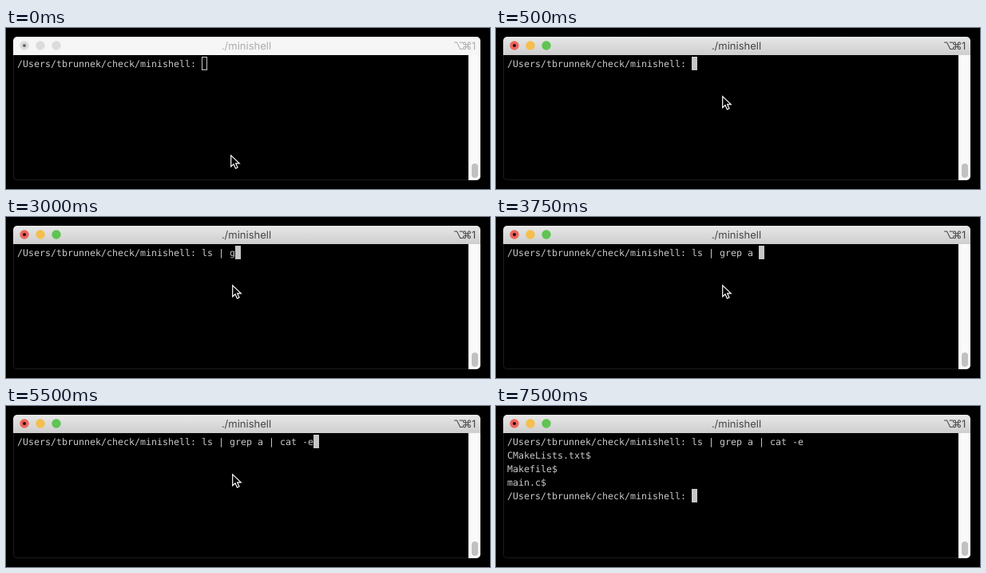
Write an HTML page that moves like this. It is 606x202 px and loops after 7.75 s.

```html
<!DOCTYPE html>
<html lang="en">
<head>
<meta charset="utf-8">
<title>minishell</title>
<style>
  html, body { margin: 0; width: 100%; height: 100%; overflow: hidden; background: #000; }
  svg { display: block; width: 606px; height: 202px; }
  text { white-space: pre; text-rendering: geometricPrecision; }
  .bar { font: 13px Inter, "Liberation Sans", sans-serif; }
  .term { font: 11.63px "DejaVu Sans Mono", monospace; fill: #c9c9c9; }
</style>
</head>
<body>
<svg viewBox="0 0 606 202">
  <defs>
    <linearGradient id="active" x2="0" y2="1">
      <stop stop-color="#e7e7e7"/><stop offset="1" stop-color="#cecece"/>
    </linearGradient>
    <clipPath id="frame"><rect x="9" y="11" width="585" height="180" rx="5"/></clipPath>
  </defs>
  <rect width="606" height="202"/>
  <g clip-path="url(#frame)">
    <rect id="bar" x="9" y="11" width="585" height="23"/>
    <rect x="579" y="34" width="15" height="157" fill="#fafafa"/>
    <rect x="583" y="170" width="8" height="18" rx="4" fill="#c1c1c1"/>
  </g>
  <path d="M9.5 34V187q0 3.5 4 3.5H579" fill="none" stroke="#1c1c1c"/>
  <g id="lights">
    <circle cx="23" cy="22" r="5.7"/>
    <circle cx="43" cy="22" r="5.7"/>
    <circle cx="63" cy="22" r="5.7"/>
  </g>
  <circle id="dot" cx="23" cy="22" r="2"/>
  <g id="labels" class="bar">
    <text x="301" y="27" text-anchor="middle">./minishell</text>
    <text x="560 570.5 583" y="27">⌥⌘1</text>
  </g>
  <g id="lines" class="term"></g>
  <rect id="cursor"/>
  <path id="mouse" d="M.7.9V14.9L4 11.8 6.4 17.2 9 16 6.7 10.9H11.2Z" fill="#000" stroke="#fff" stroke-width="1.2"/>
</svg>
<script>
const LOOP = 7750;
const CELL = 7, ROW = 17, LEFT = 14, TOP = 36;
const FOCUS = 500, ENTER = 5750;
const PROMPT = "/Users/tbrunnek/check/minishell: ";
const COMMAND = "ls | grep a | cat -e";
const OUTPUT = ["CMakeLists.txt$", "Makefile$", "main.c$"];

// [start ms, characters typed]
const typing = [
  [0, 0], [1250, 1], [1500, 2], [2250, 3], [2500, 4], [2750, 5], [3000, 6],
  [3250, 9], [3500, 11], [3750, 12], [4000, 13], [4500, 14], [4750, 16],
  [5000, 18], [5250, 19], [5500, 20]
];
// [start ms, pointer position or null when hidden]
const pointer = [
  [0, [281, 159]], [250, [283, 130]], [500, [283, 85]], [6500, [439, 5]], [6750, null]
];

const $ = id => document.getElementById(id);
const set = (node, attrs) => {
  for (const key in attrs) node.setAttribute(key, attrs[key]);
};
const at = (steps, t) => steps.findLast(([start]) => start <= t)[1];

const rows = Array.from({ length: 5 }, (_, i) => {
  const row = document.createElementNS("http://www.w3.org/2000/svg", "text");
  set(row, { x: LEFT, y: TOP + 13 + i * ROW });
  return $("lines").appendChild(row);
});

function drawWindow(focused) {
  const colors = focused ? ["#ee655c", "#f5be4e", "#5fc453"] : Array(3).fill("#dcdcdc");
  [...$("lights").children].forEach((light, i) => set(light, { fill: colors[i] }));
  set($("bar"), { fill: focused ? "url(#active)" : "#f6f6f6" });
  set($("dot"), { fill: focused ? "#2c0505" : "#6a6a6a" });
  set($("labels"), { fill: focused ? "#444" : "#acacac" });
}

function drawTerminal(t) {
  const lines = [PROMPT + COMMAND.slice(0, at(typing, t))];
  if (t >= ENTER) lines.push(...OUTPUT, PROMPT);
  rows.forEach((row, i) => { row.textContent = lines[i] || ""; });

  const last = lines.length - 1;
  const inset = t < FOCUS ? 0.5 : 0;
  set($("cursor"), {
    x: LEFT + lines[last].length * CELL + inset,
    y: TOP + last * ROW + inset,
    width: CELL - 2 * inset,
    height: ROW - 2 * inset,
    fill: inset ? "none" : "#c7c7c7",
    stroke: inset ? "#c7c7c7" : "none"
  });
}

function drawPointer(t) {
  const spot = at(pointer, t);
  set($("mouse"), {
    visibility: spot ? "visible" : "hidden",
    transform: `translate(${spot || [0, 0]})`
  });
}

function render(t) {
  drawWindow(t >= FOCUS);
  drawTerminal(t);
  drawPointer(t);
}

const begin = performance.now();
function tick() {
  render((performance.now() - begin) % LOOP);
  requestAnimationFrame(tick);
}
tick();
</script>
</body>
</html>
```
